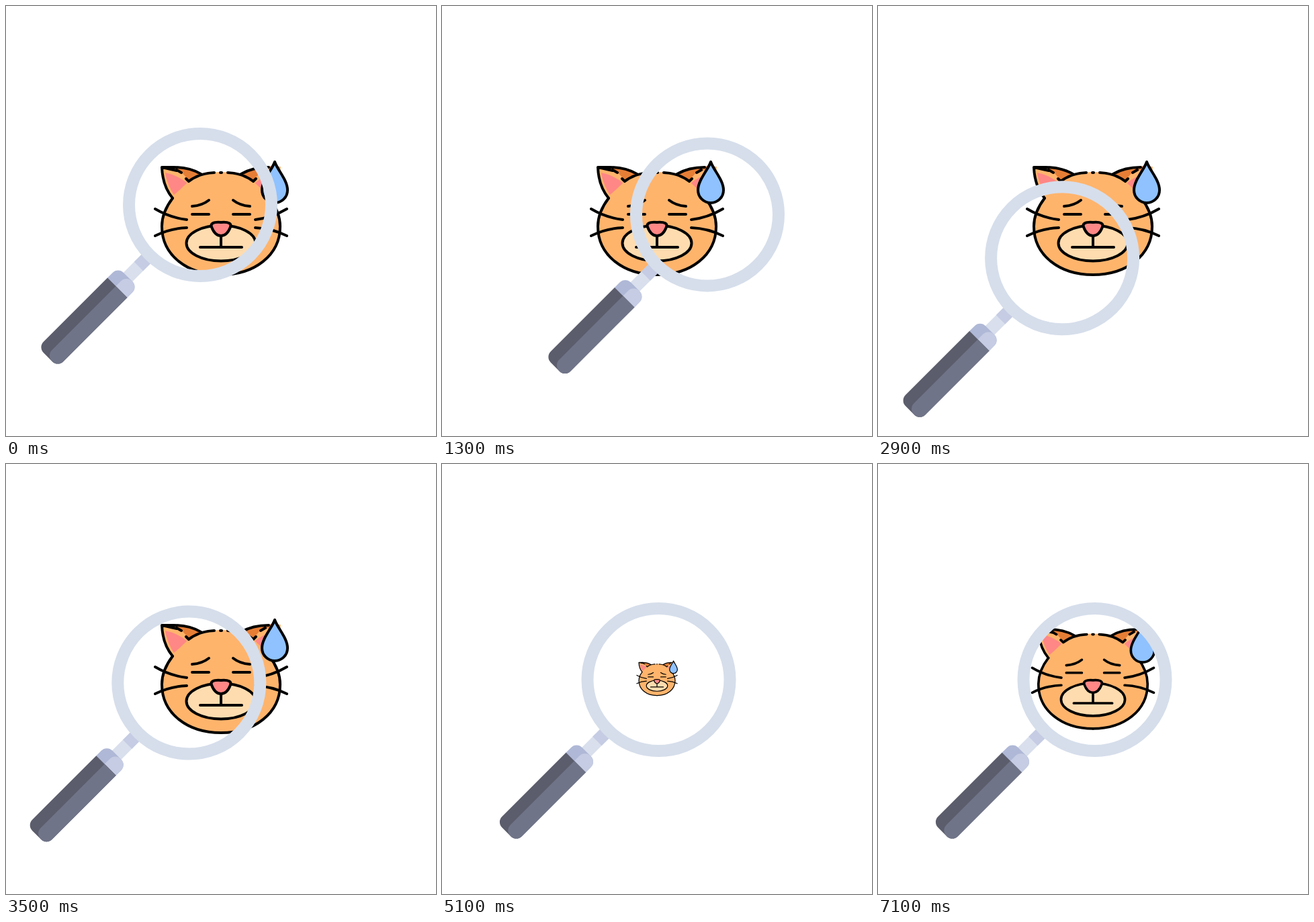
Animation of 640 by 640 pixels, one loop 7.2 s. Source, as an HTML page:

```html
<!DOCTYPE html>
<html lang="en">
<head>
<meta charset="utf-8">
<title>Looking for the cat</title>
<style>
  html, body { margin: 0; width: 100%; height: 100%; overflow: hidden; background: #fff; }
  svg { display: block; width: 100vw; height: 100vh; }
  .ink { fill: none; stroke: #000; stroke-width: 4; stroke-linecap: round; stroke-linejoin: round; }
</style>
</head>
<body>
<svg viewBox="0 0 640 640">
  <defs>
    <!-- left half of the face, used twice -->
    <g id="half">
      <path fill="#e67e36" d="M232 239Q268 236 290 251L272 262Z"/>
      <path fill="#ffb46c" d="M231 239L262 248L273 261L249 287Q233 266 231 239Z"/>
      <path fill="#ff8785" d="M237 248Q256 252 270 264L250 281Q240 266 237 248Z"/>
      <path fill="#ffb46c" d="M320 247Q287 247 272 261Q232 296 232 328C232 371 270 400 320 400Z"/>
      <g class="ink">
        <path d="M248 286C238 299 232 312 232 328C232 371 270 400 320 400"/>
        <path d="M249 240Q273 240 290 250M261 248L254 244M268 257L272 261Q287 249 310 248"/>
        <path d="M277 298Q292 297 302 289M277 310H302"/>
        <path d="M222 302Q244 315 269 318M222 342Q244 331 269 330"/>
      </g>
    </g>
  </defs>

  <g id="cat">
    <use href="#half"/>
    <use href="#half" transform="translate(640) scale(-1 1)"/>
    <ellipse class="ink" cx="320" cy="353" rx="51.5" ry="26.5" style="fill:#ffdcaf"/>
    <path class="ink" d="M248 286Q233 268 232 240H249M232 240L254 245M319 248H321M320 342V359M289 359H351"/>
    <path class="ink" style="fill:#ff8785" d="M320 322C332 321 336 324 334 329C331 337 326 342 320 342S309 337 306 329C304 324 308 321 320 322Z"/>
    <path class="ink" style="fill:#8fc2ff" d="M400 232C396 244 381 259 381 274A19 19 0 0 0 419 274C419 259 404 244 400 232Z"/>
  </g>

  <g id="lens">
    <g id="handle" transform="rotate(135) scale(1 -1)">
      <path fill="#d9dfec" d="M110 -9.5H160V9.5H110Z"/>
      <path fill="#c5cce3" d="M110 -9.5H129.5V9.5H110Z"/>
    </g>
    <circle r="106" fill="none" stroke="#d6deeb" stroke-width="18"/>
  </g>
</svg>
<script>
const LOOP = 7200, STEP = 100;
const MOVE_AT = 100, LEG = 410;
const GROW_AT = 4600, GROW_FOR = 4350;
const cat = document.getElementById("cat");
const lens = document.getElementById("lens");
const handle = document.getElementById("handle");

// Evenly timed stops of the lens centre on its way round the face
const stops = [
  [289, 296], [331, 291], [372, 289.5], [396, 312.5], [399, 345.5], [381, 373.5],
  [322, 379.5], [268, 372], [266, 334], [295, 312.5], [322.5, 321]
];
const stop = i => stops[Math.max(0, Math.min(i, stops.length - 1))];

// Handle piece: square at one end, rounded at the other
function addPart(from, to, top, color, half = 20.8, r = 11.5) {
  const dir = Math.sign(to - from), sweep = dir > 0 ? 1 : 0, arc = `A${r} ${r} 0 0 ${sweep}`;
  const part = document.createElementNS("http://www.w3.org/2000/svg", "path");
  part.setAttribute("fill", color);
  part.setAttribute("d",
    `M${from} ${top}H${to - dir * r}${arc} ${to} ${top + r}` +
    `V${half - r}${arc} ${to - dir * r} ${half}H${from}Z`);
  handle.append(part);
}

const TOP = -20.8, SPLIT = -3.2;
addPart(175, 152, TOP, "#afb8d6");
addPart(175, 152, SPLIT, "#c5cce3");
addPart(174.3, 320.5, TOP, "#5b5d6c");
addPart(174.3, 320.5, SPLIT, "#707488");

// Catmull-Rom curve through the stops
function lensAt(t) {
  const s = Math.max(0, Math.min((t - MOVE_AT) / LEG, stops.length - 1));
  const i = Math.floor(s), u = s - i;
  return [0, 1].map(k => {
    const [a, b, c, d] = [-1, 0, 1, 2].map(n => stop(i + n)[k]);
    return b + u * ((c - a) + u * ((2 * a - 5 * b + 4 * c - d) + u * (3 * (b - c) + d - a))) / 2;
  });
}

function catScale(t) {
  return t < GROW_AT ? 1 : 1 - (1 - (t - GROW_AT) / GROW_FOR) ** 3;
}

function draw(now) {
  const t = Math.floor((now % LOOP) / STEP) * STEP;
  lens.setAttribute("transform", `translate(${lensAt(t)})`);
  cat.setAttribute("transform", `translate(320 320) scale(${catScale(t)}) translate(-320 -320)`);
}

function tick() {
  draw(performance.now());
  requestAnimationFrame(tick);
}
tick();
</script>
</body>
</html>
```
